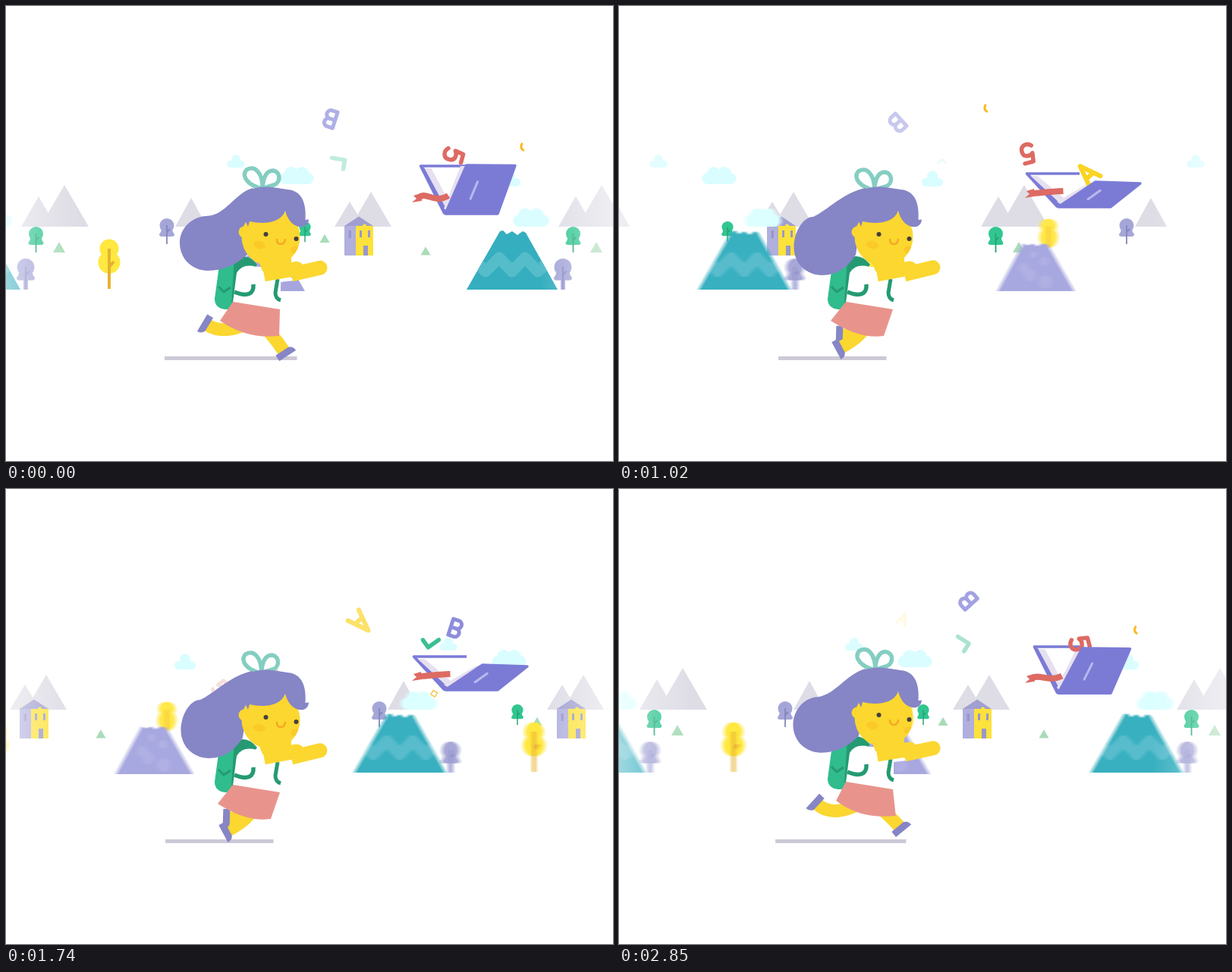
An HTML page with a canvas that plays this animation: 800 px wide and 600 px high, repeating every 2.88 s.

```html
<!DOCTYPE html>
<html lang="en">
<head>
<meta charset="utf-8">
<title>Running after the book</title>
<style>
html, body { margin: 0; width: 100%; height: 100%; overflow: hidden; background: #fff; }
canvas { display: block; }
</style>
</head>
<body>
<canvas id="stage" width="800" height="600"></canvas>
<script>
const LOOP = 2880, STRIDE = 480, STEP = 240, FRAME = 30, WIDTH = 708;
const HAIR = '#8685c6', SKIN = '#fbd730', ORANGE = '#f9b920', GREEN = '#30bc8d', DARK_GREEN = '#259a72',
      BOOK = '#7b7bd6', PAGE = '#e6e0f0', RED = '#dd6b63', CLOUD = '#dafdff', PEAK = '#dedde6',
      LILAC = '#a5a6d8', LEMON = '#ffe648';

const stage = document.getElementById('stage').getContext('2d');
let g = stage;

const mod = (a, n) => ((a % n) + n) % n;
const mix = (a, b, k) => a + (b - a) * k;
const ease = k => (1 - Math.cos(Math.PI * k)) / 2;
const newCanvas = w => Object.assign(document.createElement('canvas'), { width: w, height: 600 });

function fill(color, d) {
  g.fillStyle = color;
  g.fill(new Path2D(d));
}
function line(color, width, d, cap = 'butt') {
  g.strokeStyle = color;
  g.lineWidth = width;
  g.lineCap = cap;
  g.lineJoin = 'round';
  g.stroke(new Path2D(d));
}
function oval(color, x, y, rx, ry = rx, turn = 0) {
  g.fillStyle = color;
  g.beginPath();
  g.ellipse(x, y, rx, ry, turn, 0, 7);
  g.fill();
}
function at(x, y, degrees, scale, draw) {
  g.save();
  g.translate(x, y);
  g.rotate(degrees * Math.PI / 180);
  g.scale(scale, scale);
  draw();
  g.restore();
}

// Periodic motion: mean, cosine, sine and optional double-rate cosine.
function waver(t, period) {
  const a = t / period * 2 * Math.PI;
  return (mean, c, s, c2 = 0) => mean + c * Math.cos(a) + s * Math.sin(a) + c2 * Math.cos(2 * a);
}
// Smooth closed curve through evenly timed values.
function glide(values, turn) {
  const n = values.length, i = Math.floor(turn * n), u = turn * n - i;
  const [a, b, c, d] = [-1, 0, 1, 2].map(j => values[mod(i + j, n)]);
  return b + u / 2 * (c - a + u * (2 * a - 5 * b + 4 * c - d + u * (3 * (b - c) + d - a)));
}

// ---------- scenery ----------
function cloud(x, y, scale, big) {
  at(x, y, 0, scale, () => {
    const w = big ? 15 : 8.5, r = big ? 7.5 : 5.5;
    fill(CLOUD, `M${-w} 0H${w}V-11H${-w}Z`);
    oval(CLOUD, -w, -r, r);
    oval(CLOUD, w, -r, r);
    if (big) {
      oval(CLOUD, -7, -14, 9);
      oval(CLOUD, 7, -14, 9);
    } else oval(CLOUD, 0, -13.5, 7);
  });
}
function tree(x, y, scale, leaf, trunk) {
  at(x, y, 0, scale, () => {
    oval(leaf, 0, 9.5, 9.5);
    fill(leaf, 'M-7 12Q-7 18-10 21Q-10 24-7 24H7Q10 24 10 21Q7 18 7 12Z');
    line(trunk, 1.8, 'M0 9V34M0 18L4 14');
  });
}
const triangle = (color, x, top, half, base) => fill(color, `M${x - half} ${base}L${x} ${top}L${x + half} ${base}Z`);
const peak = (x, top, half) => triangle(PEAK, x, top, half, 291);
const bush = (x, base, size) => triangle('#a9dcb9', x, base - 1.75 * size, size, base);

function drawFar() {
  cloud(303, 213, 0.83);
  cloud(383, 235, 1, true);
  cloud(664, 238, 1);
  peak(43, 251, 23);
  peak(77, 236, 32);
  peak(244, 253, 21);
  peak(453, 258, 20);
  peak(481, 245, 27);
  tree(212, 280, 1, LILAC, '#8485bd');
  tree(394, 284, 0.8, '#31c690', '#25a377');
  tree(39.5, 291, 1, '#31c690', '#25a377');
  bush(70, 325, 8);
  bush(420, 312, 6.5);
  bush(553, 328.5, 6.5);
  fill('#b0afdd', 'M446 290H463V329H446Z');
  fill('#fde23b', 'M461 290H484V329H461Z');
  fill('#a09fd0', 'M446 290L465 277.5L484 290Z');
  fill('#9797cd', 'M451.5 296H455V306H451.5ZM466 296H469V305H466ZM477 296H480V305H477ZM471 316H477V329H471Z');
  oval('#fde23b', 472.5, 290, 2.5);
}
function drawNear() {
  oval(LEMON, 360, 290, 11, 9.5);
  oval(LEMON, 360, 305, 12, 14);
  line('#eec235', 3, 'M360 291V319');
  fill('#a6a5dd', 'M293 376L327 313L333 316L339 313L345 317L352 313L359 315L394 376Z');
  for (let i = 0; i < 5; i++) oval('#b0afe1', 340 + 16 * Math.sin(i * 2), 328 + i * 9, 5 + i);

  line('#a9a9de', 6, 'M734 355V374');
  tree(734, 333, 1.2, LILAC, '#8c8cc5');

  oval('#ffe83f', 136, 320, 12.5);
  oval('#ffe83f', 136, 338, 14.5, 15);
  line('#e5b233', 4, 'M136 320V373M136 344L142 337');

  const hill = 'M607 374L651 297L655 296L660 301L667 297L674 302L681 297L685 299L727 374Z';
  fill('#35aebf', hill);
  g.save();
  g.clip(new Path2D(hill));
  line('#55bcc9', 15, 'M616 334L632 350L650 332L667 350L684 332L701 350L718 334');
  g.restore();
  cloud(692, 291, 1.05, true);
}
function makeStrip(draw) {
  const c = newCanvas(WIDTH);
  g = c.getContext('2d');
  for (const dx of [-WIDTH, 0, WIDTH]) {
    g.setTransform(1, 0, 0, 1, dx, 0);
    draw();
  }
  g = stage;
  return c;
}
const far = makeStrip(drawFar), near = makeStrip(drawNear);
const smear = newCanvas(800), smearCtx = smear.getContext('2d');
smearCtx.globalCompositeOperation = 'lighter';

function scroll(ctx, strip, shift) {
  for (let x = -Math.round(mod(shift, WIDTH)); x < 800; x += WIDTH) ctx.drawImage(strip, x, 0);
}
function scenery(t) {
  scroll(g, far, t / LOOP * WIDTH);
  // Horizontal motion blur: average of shifted copies.
  const copies = t % 1440 ? [-3, -1, 1, 3] : [0];
  smearCtx.clearRect(0, 0, 800, 600);
  smearCtx.globalAlpha = 1 / copies.length;
  copies.forEach(dx => scroll(smearCtx, near, t / 1440 * WIDTH + dx));
  g.drawImage(smear, 0, 0);

  const fade = g.createLinearGradient(0, 0, 800, 0);
  [[0, 0.5], [0.12, 0], [0.88, 0], [1, 0.5]].forEach(([p, a]) => fade.addColorStop(p, `rgba(255,255,255,${a})`));
  g.fillStyle = fade;
  g.fillRect(0, 0, 800, 600);
}

// ---------- book and letters ----------
// Each letter leaves the book at `born`, arcs from one point to another, spins and fades.
const LETTERS = [
  { color: RED, width: 5.5, d: 'M7-12H-4.5L-6-1C-3-4 7-5 7 4S-2 14-7 9',
    born: 390, from: [621, 226], to: [251, 272], rise: 42, turn: 15, spin: 1 },
  { color: '#fbd322', width: 6, d: 'M-10 14L0-14L10 14M-6 4H6',
    born: 510, from: [620, 230], to: [365, 170], rise: 27, turn: -22, spin: -0.75 },
  { color: GREEN, width: 5.5, d: 'M17 0H0V-12',
    born: 590, from: [626, 224], to: [421, 202], rise: 8, turn: 107, spin: -0.75 },
  { color: '#8d8ddd', width: 5, d: 'M-6-11V11H1.5A5.5 5.5 0 0 0 1.5 0H-6M1.5 0A5.5 5.5 0 0 0 1.5-11H-6',
    born: 700, from: [614, 235], to: [285, 162], rise: 64, turn: 98, spin: -1 }
];
function letter({ color, width, d, born, from, to, rise, turn, spin }, t) {
  const life = mod(t - born, STRIDE) / STRIDE, k = ease(life);
  const x = mix(from[0], to[0], k);
  const y = mix(from[1], to[1], k) - rise * Math.sin(Math.PI * Math.sqrt(k));
  g.globalAlpha = Math.max(0, Math.min(1, 1.65 - 1.75 * life));
  at(x, y, turn + spin * life * STRIDE, Math.min(1, 4.5 * (1 - life)), () => line(color, width, d, 'round'));
  g.globalAlpha = 1;
}

// Confetti swells and shrinks around its peak time while drifting left.
const ARC = 'M-2-5Q-4 3 3 4', SQUARE = 'M-3.5-3.5H3.5V3.5H-3.5Z';
const BITS = [
  { color: ORANGE, width: 3, d: ARC, peak: 0, x: 681, y: 186, drift: -0.02 },
  { color: ORANGE, width: 3, d: ARC, peak: 1020, x: 484, y: 135, drift: -0.1 },
  { color: '#fbdc55', width: 2, d: SQUARE, peak: 600, x: 637, y: 143, drift: -0.1 },
  { color: '#f9c03d', width: 1.5, d: SQUARE, peak: 1860, x: 545, y: 265, drift: -0.16 },
  { color: '#a9a9dc', width: 3, d: 'M-10-14Q-4-14-5-8T0-1Q6 0 4 6T10 14', peak: 600, x: 527, y: 275, drift: -0.2 },
  { color: '#a9a9dc', width: 3, d: 'M-7-9H-2V0H6V9', peak: 2460, x: 506, y: 143, drift: -0.2 }
];
function bit({ color, width, d, peak, x, y, drift }, t) {
  const dt = mod(t - peak + LOOP / 2, LOOP) - LOOP / 2;
  if (Math.abs(dt) > 400) return;
  at(x + drift * dt, y + drift * dt / 4, 15 - dt / 8, Math.cos(dt / 400 * Math.PI / 2), () => line(color, width, d));
}

function book(t) {
  const wave = waver(t, STEP);
  const fx = wave(617, -4, 5, -6), fy = wave(220.5, -7, 8, -3.5);
  const rx = wave(682, -9, 3, -2), ry = fy + wave(2, -1.5, 0);
  const bx = wave(541, 5.5, -3.5), by = wave(213, -0.5, 6.5, -1.5);
  const low = wave(263, 11, 2);
  fill('#fff', `M${bx} ${by}H607L${fx} ${fy}L578 ${low}Z`);
  line(BOOK, 3.5, `M607 ${by}H${bx}L578 ${low}`);
  fill(BOOK, `M${bx} ${by}L${bx + 8} ${by + 4}L584 ${low - 5}L578 ${low}Z`);
  fill(PAGE, `M${bx + 5} ${by + 3}H${bx + 14}L586 ${low - 12}L581 ${low - 5}Z`);
  fill(PAGE, `M${fx - 8} ${fy + 1}H${fx + 2}L583 ${low - 3}L577 ${low - 7}Z`);

  BITS.forEach(b => bit(b, t));
  LETTERS.forEach(l => letter(l, t));

  const cover = `M${fx} ${fy}L${rx} ${ry}L648 ${low}H579Z`;
  fill(BOOK, cover);
  line(BOOK, 3.5, cover);
  const spot = v => `${mix(mix(578, fx, v), mix(648, rx, v), 0.37)} ${mix(low, fy, v)}`;
  line('#b9b8ee', 3, `M${spot(0.31)}L${spot(0.66)}`, 'round');

  const tail = wave(250.5, 7.5, 1.5), curl = wave(0.5, -0.5, 0);
  line(RED, 8, `M544 ${tail - 5}C${553 + 3 * curl} ${tail - 15 + 19 * curl} 565 ${tail + 4 - 22 * curl} ${583 + 5 * curl} ${tail - 8}`);
  fill(RED, `M547 ${tail - 11}L537 ${tail - 8}L541 ${tail - 4}L535 ${tail + 1}L548 ${tail - 1}Z`);
}

// ---------- girl ----------
// Ankle path over one stride, at equal time steps.
const ANKLE_X = [366, 293, 269, 262, 266, 294, 333, 360];
const ANKLE_Y = [455, 450, 442, 416, 421, 434, 446, 436];

function leg(t, bob) {
  const wave = waver(t, STRIDE), turn = mod(t, STRIDE) / STRIDE;
  const x = glide(ANKLE_X, turn), y = glide(ANKLE_Y, turn);
  const kneeX = wave(321, 30, -25), kneeY = wave(434, -2, 1);
  const shin = Math.atan2(y - kneeY, x - kneeX) * 180 / Math.PI;
  line(SKIN, 17, `M330 ${412 + bob}Q${kneeX} ${kneeY} ${x} ${y}`);
  at(x, y, shin - 90, 1, () => fill(HAIR, 'M-12-1H8Q14 1 14 8H-12Z'));
}
function arm(x, y, turn, length) {
  at(x, y, turn, 1, () => fill(SKIN, `M0-9.5H${length}A9 9 0 0 1 ${length} 9.5H0Z`));
}
function head(swing) {
  at(-3 * swing, 4 * swing, 0, 1, () => line('#84cec1', 5.5,
    'M338 241C320 237 309 225 317 216C327 209 339 220 338 241C339 225 343 217 352 217C363 219 362 233 353 236Q346 238 338 241'));

  const x = 229 + 3 * swing, drop = 12 * swing;
  fill(HAIR, `M325 240C${300 - 10 * swing} ${248 - 4 * swing} ${290 - 30 * swing} ${276 - 13 * swing} ${264 - 16 * swing} ${277 + 2 * swing}
    C${244 - 6 * swing} ${278 + swing} ${x} ${294 + drop} ${x} ${312 + drop}
    C${x} ${334 + drop} ${x + 17} ${349 + drop} ${x + 37} ${349 + drop}
    C${x + 58} ${349 + drop} ${305 - 5 * swing} ${340 + drop / 2} ${318 - drop} 328Z`);

  oval(SKIN, 314, 298, 7.5);
  oval(ORANGE, 316, 298, 5);
  const face = new Path2D();
  face.arc(349, 304.5, 38.5, 0, 7);
  g.fillStyle = SKIN;
  g.fill(face);
  g.save();
  g.clip(face);
  oval('#fbc928', 334, 315, 8, 5, 0.2);
  oval('#fbc928', 381, 321, 6, 4.5, -0.3);
  g.restore();
  oval('#45403d', 342.5, 301, 3);
  oval('#45403d', 382.5, 307, 3);
  line('#f7a823', 2.5, 'M357 308Q357 314 362 314Q367 314 368 308', 'round');
  fill(HAIR, 'M316 244C340 234 355 240 375 242.5C391 246 396 262 394.5 282L399 281.5C398 297 374 295 368 270C362 287 338 288 321 284L319 291L314 280Z');
}
function girl(t) {
  const wave = waver(t, STEP), bob = wave(-4, 4, 4), armTurn = wave(-16, 5.5, 0, -2.4);
  fill('#cdc9d7', `M${wave(204, 7, 4, -2)} 462H${wave(365, 12.5, -6.5, 6)}V467H${wave(204, 7, 4, -2)}Z`);
  leg(t + STEP, bob);
  leg(t, bob);

  g.save();
  g.translate(0, bob);
  fill(GREEN, 'M281 342L303 328L306 392Q303 399 297 400H288Q275 398 275 386Z');
  line(DARK_GREEN, 3, 'M280 370L287 377L296 371');
  fill(DARK_GREEN, 'M301 333Q318 324 331 341L326 347L306 362L302 390L297 391Z');
  fill('#fff', 'M304 352Q312 339 330 344H362L380 362L362 364V402L299 391Z');
  line(DARK_GREEN, 5.5, 'M301 377C318 384 327 380 326 367');
  line(DARK_GREEN, 5, 'M358 360L355 378Q355 386 362 388');
  fill('#e8948d', `M299 390L361 400L${wave(357, 3, -8)} 435Q318 440 ${wave(284, -2, -5)} 415Z`);
  fill(SKIN, 'M333 336L338 350L376 345V332Z');
  arm(340, 354, armTurn + 3, 44);
  arm(376, 354, armTurn, 39);
  g.restore();

  at(0, bob * 0.75, 0, 1, () => head(wave(0.5, -0.5, 0)));
}

function draw(now) {
  const t = Math.floor(mod(now, LOOP) / FRAME) * FRAME;
  g.fillStyle = '#fff';
  g.fillRect(0, 0, 800, 600);
  scenery(t);
  book(t);
  girl(t);
}
const begin = performance.now();
function tick() {
  draw(performance.now() - begin);
  requestAnimationFrame(tick);
}
tick();
</script>
</body>
</html>
```
